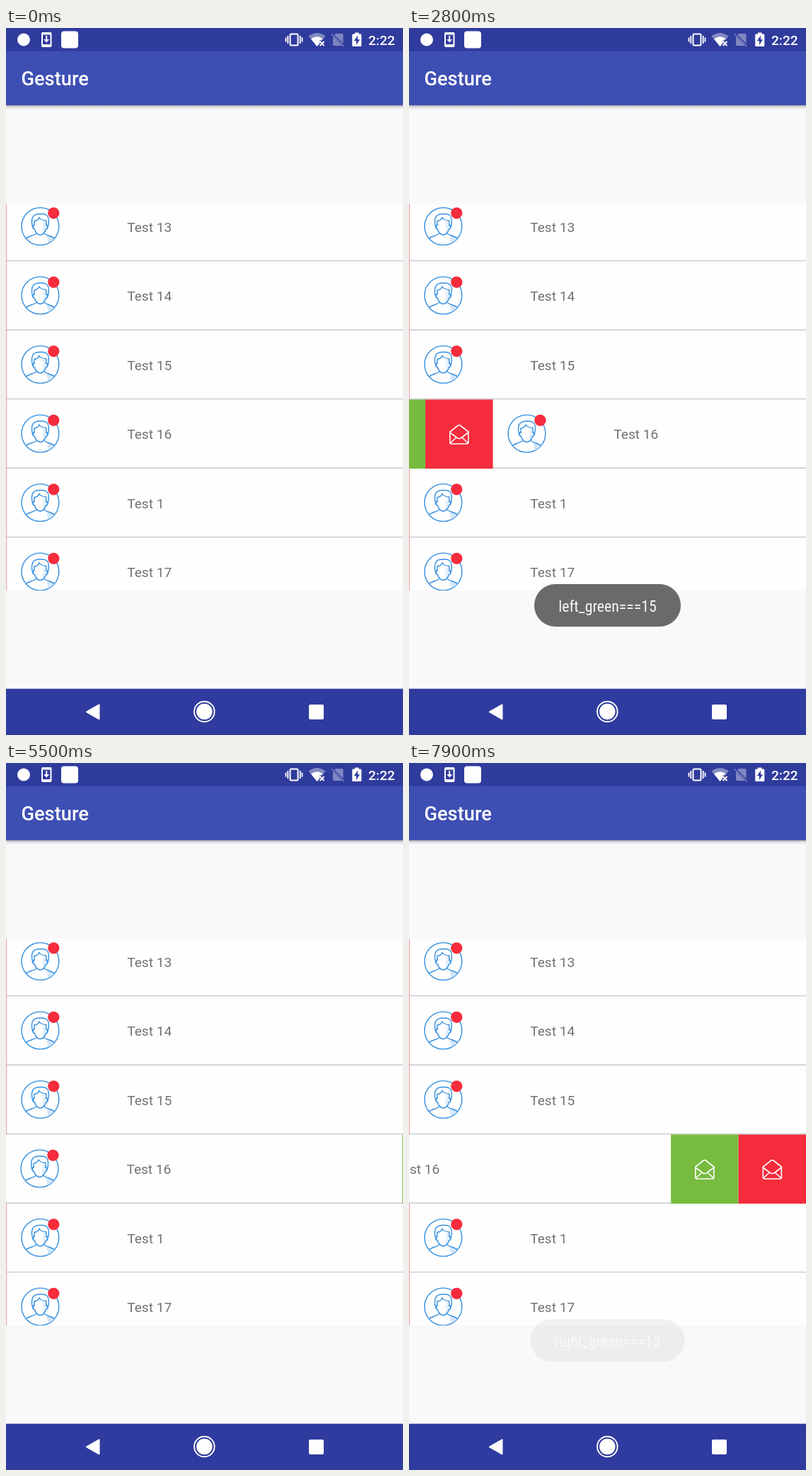
An HTML page for the animation above (8000 ms loop, 561 px wide and 998 px high).

```html
<!DOCTYPE html>
<html lang="en">
<head>
<meta charset="utf-8">
<title>Swipe list</title>
<style>
html, body { margin: 0; width: 100%; height: 100%; overflow: hidden; background: #f9f8fa; }
svg { display: block; width: 100vw; height: 100vh; }
text { font-family: Roboto, "Noto Sans", sans-serif; }
.label { font-size: 19.09px; fill: #717174; }
.toast { font-family: "Roboto Condensed", Roboto, sans-serif; font-stretch: 75%; font-size: 21.82px; fill: #fafafa; text-anchor: middle; }
</style>
</head>
<body>
<svg viewBox="0 0 561 998" preserveAspectRatio="none">
  <defs>
    <linearGradient id="shade" x2="0" y2="1">
      <stop offset="0" stop-opacity=".34"/>
      <stop offset=".4" stop-opacity=".12"/>
      <stop offset="1" stop-opacity="0"/>
    </linearGradient>
    <clipPath id="listBox"><rect y="248" width="561" height="546"/></clipPath>

    <!-- centred on its ring -->
    <g id="avatar" fill="none" stroke="#338fe0" stroke-width="1.4" stroke-linecap="round" stroke-linejoin="round">
      <circle r="26.4" fill="#fff"/>
      <path d="M9 13 Q18 14.500 21 15.500 Q17 21 11 23.500 Z" fill="#d3e6fa" stroke="none"/>
      <path d="M4 -7 H8 V2 Q7 9 3 11 Z" fill="#e3effb" stroke="none"/>
      <path d="M-10 3 C-12 -1 -13 -10 -10 -14 Q-7 -18 1 -17.500 Q8 -18 10.500 -14 C13 -10 12 -1 10 3"/>
      <path d="M-8.500 -1 V-7.500 Q-3 -8 -1.500 -12.500 Q1 -8.500 8.500 -8 V-1"/>
      <path d="M-8.500 -2 C-11 -2 -10.500 4 -8 4 C-7 9 -3 12 0 12 C3 12 7 9 8 4 C10.500 4 11 -2 8.500 -2"/>
      <path d="M-20 17 C-17 14 -11 13.500 -6 10.500 M6 10.500 C11 13.500 17 14 20 17"/>
    </g>

    <g id="mail" fill="none" stroke="#fff" stroke-width="1.6" stroke-linecap="round" stroke-linejoin="round">
      <path d="M-13 -4 L-1.500 -13 Q0 -14 1.500 -13 L13 -4 V11 Q13 13 11 13 H-11 Q-13 13 -13 11 Z"/>
      <path d="M-13 -3 L-3 4.500 Q0 6.500 3 4.500 L13 -3 M-12.500 12 L-4 4 M12.500 12 L4 4"/>
    </g>

    <g id="actions">
      <rect width="95.45" height="97.5" fill="#77bb3f"/>
      <rect x="95.45" width="95.45" height="97.5" fill="#f52c3c"/>
      <use href="#mail" x="47.7" y="49.5"/>
      <use href="#mail" x="143.2" y="49.5"/>
    </g>
  </defs>

  <rect width="561" height="998" fill="#f9f8fa"/>
  <g clip-path="url(#listBox)">
    <rect y="248" width="561" height="546" fill="#fefefe"/>
    <g id="list"></g>
  </g>
  <g id="toasts"></g>

  <rect y="109" width="561" height="6" fill="url(#shade)"/>
  <rect y="32" width="561" height="77" fill="#3e4fb3"/>
  <rect width="561" height="32.7" fill="#303c9d"/>
  <text x="21.4" y="81.3" font-size="27.27" font-weight="500" fill="#fff">Gesture</text>

  <g id="status" fill="#fff">
    <circle cx="25" cy="16.500" r="9"/>
    <rect x="51" y="7" width="12.500" height="19" rx="1.500" fill="none" stroke="#fff" stroke-width="2"/>
    <path d="M51 6 h12.500 v3.500 h-12.500z M51 23 h12.500 v3.500 h-12.500z M56.200 11 h2 v5 h3 l-4 4.500 l-4 -4.500 h3z"/>
    <rect x="78" y="4.500" width="24" height="24" rx="4"/>

    <rect x="401.500" y="8.500" width="11" height="16" rx="1.500" fill="none" stroke="#fff" stroke-width="2"/>
    <path d="M398.300 11 V22 M395.500 13.500 V19.500 M415.700 11 V22 M418.500 13.500 V19.500" fill="none" stroke="#fff" stroke-width="1.800"/>
    <path d="M427.500 11.500 Q439.500 2.500 451.500 11.500 L439.500 26 Z" opacity=".4"/>
    <path d="M431 15.500 Q439.500 9 448 15.500 L443 17.500 V22 L439.500 26 Z"/>
    <path d="M443.500 19 L449.500 25 M449.500 19 L443.500 25" fill="none" stroke="#fff" stroke-width="1.800"/>
    <g opacity=".38">
      <path d="M466 8 H475 Q476.500 8 476.500 9.500 V22 L464 9.500 Z M462 12 L475 25 H463.500 Q462 25 462 23.500 Z"/>
      <path d="M460 8.500 L477.500 26" fill="none" stroke="#fff" stroke-width="1.500"/>
    </g>
    <path d="M493 6.500 h5.500 v2 h2.500 q1.300 0 1.300 1.300 v15 q0 1.300 -1.300 1.300 h-10.500 q-1.300 0 -1.300 -1.300 v-15 q0 -1.300 1.300 -1.300 h2.500z"/>
    <path d="M497 10.500 L491.800 18.300 H495 V24 L500 16.200 H497 Z" fill="#303c9d"/>
    <text x="512" y="23.500" font-size="19.09" font-weight="500">2:22</text>
  </g>

  <rect y="932.7" width="561" height="65.3" fill="#2f3b9e"/>
  <g fill="#fff">
    <path d="M114 965.300 L131.500 955.300 V975.300 Z" stroke="#fff" stroke-width="2" stroke-linejoin="round"/>
    <circle cx="280.300" cy="965" r="14.300" fill="none" stroke="#fff" stroke-width="1.900"/>
    <circle cx="280.300" cy="965" r="11.200"/>
    <rect x="428" y="955" width="21" height="21" rx="2"/>
  </g>
</svg>
<script>
const LOOP = 8000, STEP = 100;
const ROW = 97.5, TOP = 232, PANEL = 190.9, FADE = 430;
const labels = [13, 14, 15, 16, 1, 17];
const swiped = 3;

// dir 1 shows the left actions, -1 the right ones
const swipes = [
  { dir: 1, open: 400, span: 364, close: 800 },
  { dir: 1, open: 2700, span: 364, close: 3000 },
  { dir: -1, open: 4300, span: 550, close: 5250 },
  { dir: -1, open: 7100, span: 364, close: Infinity }
];
const toasts = [
  { text: "left_green===15", show: 870, hide: 2780 },
  { text: "left_red===15", show: 2950, hide: 4880 },
  { text: "right_green===15", show: 5500, hide: 7500 }
];

const byId = id => document.getElementById(id);
const clamp = v => Math.min(1, Math.max(0, v));
const easeOut = p => 1 - (1 - clamp(p)) ** 3;

byId("list").innerHTML = labels.map((n, i) => `
  <g transform="translate(0 ${TOP + i * ROW})">
    <g class="row">
      <rect width="561" height="${ROW}" fill="#fefefe"/>
      <rect y="${ROW - 1.5}" width="561" height="1.5" fill="#c6c9cb"/>
      <use href="#avatar" x="48.4" y="48"/>
      <circle cx="67.3" cy="29.3" r="8.1" fill="#f52c3c"/>
      <text class="label" x="171.3" y="55.7">Test ${n}</text>
      <use href="#actions" x="${0.5 - PANEL}"/>
      <use href="#actions" x="561"/>
    </g>
  </g>`).join("");

byId("toasts").innerHTML = toasts.map(({ text }) => `
  <g>
    <rect y="785" height="60" rx="30" fill="#656264"/>
    <text class="toast" x="280.5" y="824">${text}</text>
  </g>`).join("");

const row = document.querySelectorAll(".row")[swiped];
const bubbles = [...byId("toasts").children];

// without a condensed face, use the regular one a size smaller
const captions = bubbles.map(b => b.querySelector("text"));
if (captions[0].getComputedTextLength() > 146) {
  captions.forEach(c => c.style.fontSize = "19.09px");
}
bubbles.forEach((b, i) => {
  const width = captions[i].getComputedTextLength() + 68.5;
  const pill = b.querySelector("rect");
  pill.setAttribute("x", 280.5 - width / 2);
  pill.setAttribute("width", width);
});

function shiftAt(t) {
  return swipes.reduce((sum, s) =>
    sum + s.dir * PANEL * (easeOut((t - s.open) / s.span) - easeOut((t - s.close) / 300)), 0);
}

function draw(t) {
  row.setAttribute("transform", `translate(${shiftAt(t).toFixed(2)} 0)`);
  toasts.forEach(({ show, hide }, i) => {
    const alpha = clamp((t - show) / FADE) - clamp((t - hide) / FADE);
    bubbles[i].setAttribute("opacity", alpha.toFixed(3));
  });
}

const start = performance.now();
function tick() {
  const t = (performance.now() - start) % LOOP;
  draw(Math.floor(t / STEP) * STEP);
  requestAnimationFrame(tick);
}
draw(0);
requestAnimationFrame(tick);
</script>
</body>
</html>
```
